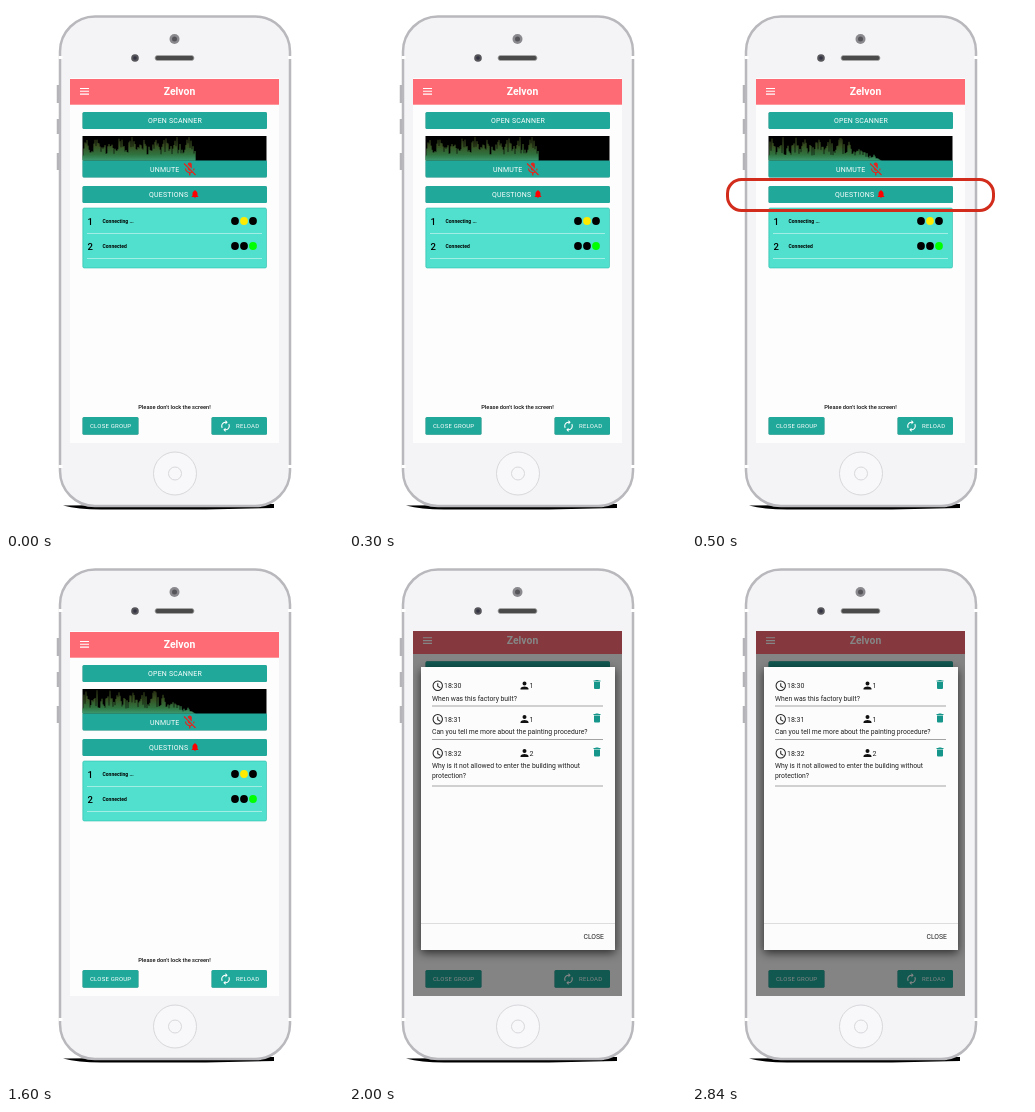
Write an HTML page that moves like this. It is 337x525 px and loops after 3.4 s.

```html
<!DOCTYPE html>
<html lang="en">
<head>
<meta charset="utf-8">
<style>
  html, body { margin: 0; width: 100%; height: 100%; overflow: hidden; background: #fff; }
  svg { display: block; width: 337px; height: 525px; font-family: Roboto, sans-serif; }
  .caps { font-size: 7px; letter-spacing: .2px; fill: #fff; }
  .small { font-size: 6px; }
  .button { fill: #20a99b; filter: drop-shadow(0 .6px .5px #0005); }
  .row { font-size: 5px; font-weight: 700; }
  .number { font-size: 9.5px; font-weight: 500; }
  .note { font-size: 6.8px; fill: #222; }
  .time { font-size: 7px; fill: #222; }
</style>
</head>
<body>
<svg viewBox="0 0 337 525">
  <defs>
    <linearGradient id="level" gradientUnits="userSpaceOnUse" x1="0" y1="130" x2="0" y2="155">
      <stop offset="0" stop-color="#2c3012"/>
      <stop offset=".4" stop-color="#4a6a2c"/>
      <stop offset=".75" stop-color="#3f9a55"/>
      <stop offset="1" stop-color="#52d09a"/>
    </linearGradient>
    <clipPath id="screen"><rect x="64" y="72" width="209" height="365"/></clipPath>
    <symbol id="micOff" viewBox="0 0 24 24"><path d="M19 11h-1.7c0 .74-.16 1.43-.43 2.05l1.23 1.23c.56-.98.9-2.09.9-3.28zm-4.02.17c0-.06.02-.11.02-.17V5c0-1.66-1.34-3-3-3S9 3.34 9 5v.18zM4.27 3 3 4.27l6.01 6.01V11c0 1.66 1.33 3 2.99 3 .22 0 .44-.03.65-.08l1.66 1.66c-.71.33-1.5.52-2.31.52-2.76 0-5.3-2.1-5.3-5.1H5c0 3.41 2.72 6.23 6 6.72V21h2v-3.28c.91-.13 1.77-.45 2.54-.9L19.73 21 21 19.73z"/></symbol>
    <symbol id="bell" viewBox="0 0 24 24"><path d="M12 22a2 2 0 0 0 2-2h-4a2 2 0 0 0 2 2zm6-6v-5c0-3.07-1.64-5.64-4.5-6.32V4a1.5 1.5 0 0 0-3 0v.68C7.63 5.36 6 7.92 6 11v5l-2 2v1h16v-1z"/></symbol>
    <symbol id="bin" viewBox="0 0 24 24"><path d="M6 19a2 2 0 0 0 2 2h8a2 2 0 0 0 2-2V7H6zM19 4h-3.5l-1-1h-5l-1 1H5v2h14z"/></symbol>
    <symbol id="person" viewBox="0 0 24 24"><path d="M12 12a4 4 0 1 0 0-8 4 4 0 0 0 0 8zm0 2c-2.67 0-8 1.34-8 4v2h16v-2c0-2.66-5.33-4-8-4z"/></symbol>
    <symbol id="clock" viewBox="0 0 24 24"><path d="M12 3a9 9 0 1 0 0 18 9 9 0 0 0 0-18zM12 7v6l5 3" fill="none" stroke="#222" stroke-width="2"/></symbol>
    <symbol id="renew" viewBox="0 0 24 24"><path d="M12 6v3l4-4-4-4v3c-4.42 0-8 3.58-8 8 0 1.57.46 3.03 1.24 4.26L6.7 14.8A6 6 0 0 1 12 6zm6.76 1.74L17.3 9.2A6 6 0 0 1 12 18v-3l-4 4 4 4v-3c4.42 0 8-3.58 8-8 0-1.57-.46-3.03-1.24-4.26z"/></symbol>
  </defs>

  <!-- phone -->
  <path d="M57 499.500Q72 503.500 95 503.500H200L268 502V498z"/>
  <path d="M52 79v18M52 113v15M52 147v17" stroke="#b4b4b8" stroke-width="2.500"/>
  <rect x="54" y="10.500" width="230" height="489.500" rx="35" fill="#f4f4f6" stroke="#b9b9bd" stroke-width="2.500"/>
  <path d="M52.500 51.500h4M282 51.500h4M52.500 460.500h4M282 460.500h4" stroke="#fff" stroke-width="3"/>
  <circle cx="168.500" cy="33" r="5" fill="#8a8a8e"/>
  <circle cx="168.500" cy="33" r="2.500" fill="#55555a"/>
  <circle cx="129" cy="52" r="3.800" fill="#55555a"/>
  <circle cx="129" cy="52" r="1.800" fill="#334"/>
  <rect x="149" y="49.500" width="39" height="5" rx="2.500" fill="#4a4a4a" stroke="#aaa" stroke-width=".8"/>
  <g fill="#f8f8fa" stroke="#d8d8dc">
    <circle cx="169" cy="467.500" r="21.500"/>
    <circle cx="169" cy="467.500" r="6.500"/>
  </g>

  <!-- app -->
  <rect x="64" y="72" width="209" height="365" fill="#fdfdfd"/>
  <g clip-path="url(#screen)">
    <g id="top">
      <rect x="64" y="73" width="209" height="25.700" fill="#ff6b74"/>
      <path d="M74 82.500h9M74 85.300h9M74 88.100h9" stroke="#fff" stroke-width="1.100"/>
      <text x="173.500" y="89" text-anchor="middle" font-size="10.400" font-weight="700" fill="#fff">Zelvon</text>
      <rect class="button" x="76.500" y="106" width="184.500" height="17" rx="1.500"/>
      <text class="caps" x="142" y="117">OPEN SCANNER</text>
    </g>
  </g>

  <rect class="button" x="76.500" y="154" width="184.500" height="17.500" rx="1.500"/>
  <rect x="76.500" y="130" width="184" height="24.500"/>
  <path id="wave" stroke="url(#level)" fill="none"/>
  <text class="caps" x="144" y="166">UNMUTE</text>
  <use href="#micOff" x="175.500" y="155" width="16.500" height="16.500" fill="#e0261f"/>

  <rect class="button" x="76.500" y="180" width="184.500" height="17" rx="1.500"/>
  <text class="caps" x="143" y="190.600">QUESTIONS</text>
  <use href="#bell" x="184" y="183" width="10" height="10" fill="#f00"/>

  <rect x="76.800" y="202" width="183.700" height="60" rx="1.500" fill="#50e0cd" stroke="#2cbcab" stroke-width=".6"/>
  <path d="M81 227.500h175M81 252.500h175" stroke="#a2eee4"/>
  <text class="number" x="81.500" y="218.500">1</text>
  <text class="row" x="96.500" y="216.700">Connecting ...</text>
  <text class="number" x="81.500" y="243.500">2</text>
  <text class="row" x="96.500" y="241.700">Connected</text>
  <g id="lamps"></g>

  <text id="hint" x="168.500" y="403.200" text-anchor="middle" font-size="5.700" font-weight="500" fill="#111">Please don't lock the screen!</text>
  <rect class="button" x="76.500" y="411" width="56" height="17.700" rx="1.500"/>
  <text class="caps small" x="84" y="422">CLOSE GROUP</text>
  <rect class="button" x="205.500" y="411" width="55.500" height="17.700" rx="1.500"/>
  <use href="#renew" x="213" y="413.500" width="13" height="13" fill="#fff"/>
  <text class="caps small" x="230" y="422">RELOAD</text>

  <rect id="highlight" x="35.500" y="173.500" width="266" height="31" rx="14" fill="none" stroke="#d22c1c" stroke-width="3"/>

  <g id="dialog" clip-path="url(#screen)">
    <rect x="64" y="72" width="209" height="365" opacity=".48"/>
    <rect x="72" y="108" width="194" height="283" fill="#fcfcfc" style="filter: drop-shadow(0 3px 5px #000a)"/>
    <g id="notes"></g>
    <path d="M72 364.500h194" stroke="#ddd"/>
    <text class="note" x="234.500" y="380.300">CLOSE</text>
  </g>
</svg>
<script>
const $ = id => document.getElementById(id);

const lamps = [[215, "#000", "#ffeb00", "#000"], [240, "#000", "#000", "#0f0"]];
$("lamps").innerHTML = lamps.map(([y, ...colors]) =>
  colors.map((c, i) => `<circle cx="${229 + 9 * i}" cy="${y}" r="3.9" fill="${c}"/>`).join("")).join("");

// y of the heading, y of the rule, time, votes, lines of text
const notes = [
  [126.5, 147, "18:30", 1, "When was this factory built?"],
  [160, 180.5, "18:31", 1, "Can you tell me more about the painting procedure?"],
  [194, 227, "18:32", 2, "Why is it not allowed to enter the building without", "protection?"]
];
$("notes").innerHTML = notes.map(([y, rule, time, votes, ...lines]) => `
  <use href="#clock" x="82.5" y="${y - 6}" width="12.5" height="12.5"/>
  <text class="time" x="95" y="${y + 2.7}">${time}</text>
  <use href="#person" x="169.5" y="${y - 6}" width="12" height="12" fill="#111"/>
  <text class="time" x="180.5" y="${y + 2.7}">${votes}</text>
  <use href="#bin" x="242" y="${y - 7}" width="12" height="12" fill="#16968a"/>
  ${lines.map((s, i) => `<text class="note" x="83" y="${y + 15 + 10 * i}">${s}</text>`).join("")}
  <path d="M83 ${rule}h171" stroke="#999" stroke-width=".9"/>`).join("");

// Spectrum bars: clustered ragged peaks, either cut off sharply or sloping to nothing
function spectrum(seed, sloping) {
  const random = () => (seed = seed * 16807 % 2147483647) / 2147483647;
  let d = "";
  for (let i = 0; i < 113; i++) {
    const fade = sloping ? Math.min(1, (113 - i) / 32) : 1;
    const cluster = .75 + .25 * Math.sin(i * .55);
    const height = (5 + 19 * cluster * random() ** .8) * fade;
    d += `M${77 + i} 154.5v${-height.toFixed(1)}`;
  }
  return d;
}
const waves = [spectrum(71, false), spectrum(523, true)];

let shown;
function draw(now) {
  const t = now % 3400;
  const stage = t < 500 ? 0 : t < 1000 ? 1 : t < 2000 ? 2 : 3;
  if (stage !== shown) {
    shown = stage;
    const open = stage === 3;
    $("wave").setAttribute("d", waves[stage ? 1 : 0]);
    $("highlight").style.display = stage === 1 ? "" : "none";
    $("dialog").style.display = open ? "" : "none";
    $("hint").style.display = open ? "none" : "";
    // The page sits slightly scrolled behind the dialog
    $("top").setAttribute("transform", `translate(0 ${open ? -3.7 : 0})`);
  }
  requestAnimationFrame(draw);
}
draw(0);
</script>
</body>
</html>
```
